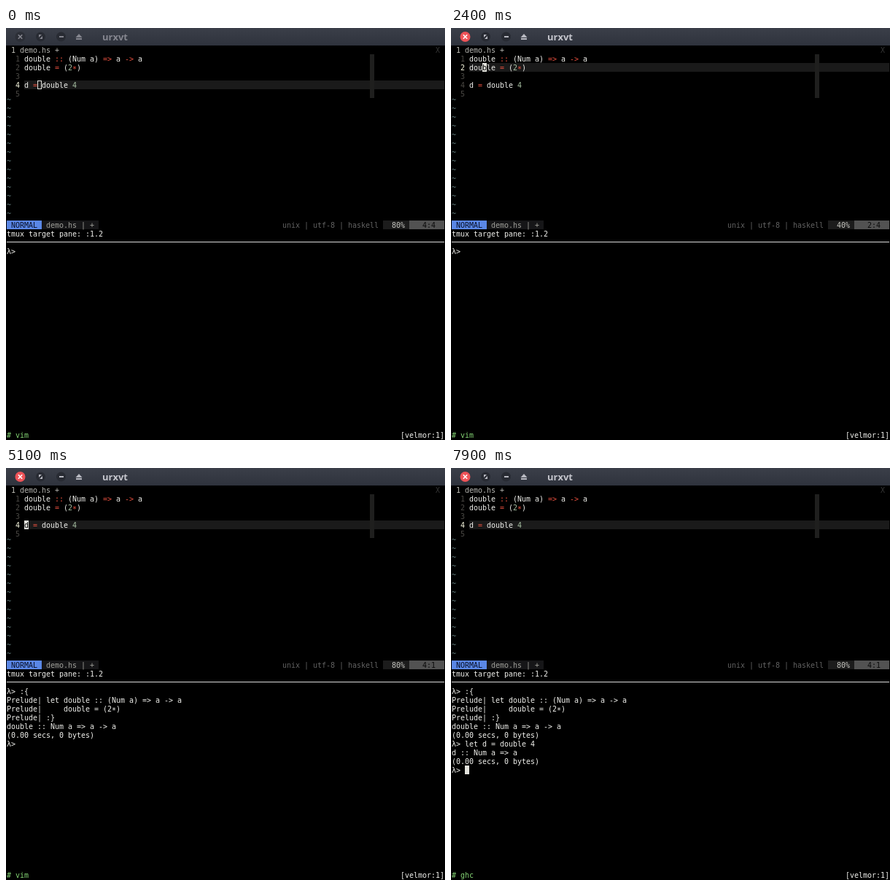
Write an HTML page with a canvas that moves like this. It is 602 by 565 pixels and loops after 8000 ms.

```html
<!DOCTYPE html>
<html lang="en">
<head>
<meta charset="utf-8">
<title>Terminal</title>
<style>
html, body { margin: 0; width: 100%; height: 100%; overflow: hidden; background: #000; }
canvas { display: block; width: 602px; height: 565px; }
</style>
</head>
<body>
<canvas id="stage" width="602" height="565"></canvas>
<script>
const ctx = document.getElementById('stage').getContext('2d');
const LOOP = 8000, CW = 6, CH = 12, LEFT = 1, TOP = 24;
const MONO = '10px "DejaVu Sans Mono", "Liberation Mono", monospace';
const FG = '#f0f0ec', RED = '#e8503f', NUM = '#a6bfa2', DIM = '#626262', BAND = '#1a1a1a';
// Glyphs that sit higher or lower in their cell than the font puts them
const LIFT = { '~': 4, '*': -2 };

const CODE = ['double :: (Num a) => a -> a', 'double = (2*)', '', 'd = double 4', ''];
const OUT_FN = [
  'λ> :{',
  'Prelude| let double :: (Num a) => a -> a',
  'Prelude|     double = (2*)',
  'Prelude| :}',
  'double :: Num a => a -> a',
  '(0.00 secs, 0 bytes)'
];
const OUT_D = ['λ> let d = double 4', 'd :: Num a => a', '(0.00 secs, 0 bytes)'];

// [time, line, column]
const MOVES = [[0, 4, 4], [2000, 3, 1], [2200, 2, 4], [3100, 1, 1],
               [4700, 2, 1], [4800, 3, 1], [4900, 4, 1]];
const FOCUS = 500, SEND_FN = 3100, SEND_D = 5900, SWITCH = 7500;

const colX = c => LEFT + c * CW;
const rowY = r => TOP + r * CH;

function fill(c, r, w, color, h = 1) {
  ctx.fillStyle = color;
  ctx.fillRect(colX(c), rowY(r), w * CW, h * CH);
}

function text(str, c, r, color) {
  ctx.font = MONO;
  ctx.fillStyle = color;
  [...str].forEach((ch, i) => {
    if (ch !== ' ') ctx.fillText(ch, colX(c + i), rowY(r) + 10 - (LIFT[ch] || 0));
  });
}

function codeLine(str, r) {
  let c = 4;
  for (const part of str.split(/(::|=>|->|[=*]|\d+)/)) {
    text(part, c, r, /^\d/.test(part) ? NUM : /^[:=*-]/.test(part) ? RED : FG);
    c += part.length;
  }
}

function disc(x, y, rad, color) {
  ctx.fillStyle = color;
  ctx.beginPath();
  ctx.arc(x, y, rad, 0, Math.PI * 2);
  ctx.fill();
}

function poly(color, ...pts) {
  ctx.fillStyle = color;
  ctx.beginPath();
  for (let i = 0; i < pts.length; i += 2) ctx.lineTo(pts[i], pts[i + 1]);
  ctx.fill();
}

function titleBar(active) {
  const grad = ctx.createLinearGradient(0, 0, 0, 24);
  grad.addColorStop(0, '#3b3f49');
  grad.addColorStop(1, '#2f333d');
  ctx.fillStyle = grad;
  ctx.fillRect(0, 0, 602, 24);

  const ink = active ? '#b9bac2' : '#85868f';
  disc(19.5, 12, 7, active ? '#ee5358' : '#2c2f37');
  disc(47.5, 12, 6.5, '#282b33');
  disc(75.5, 12, 6.5, '#282b33');

  ctx.strokeStyle = active ? '#fff' : ink;
  ctx.lineWidth = 1.6;
  ctx.beginPath();
  ctx.moveTo(16.8, 9.3); ctx.lineTo(22.2, 14.7);
  ctx.moveTo(22.2, 9.3); ctx.lineTo(16.8, 14.7);
  ctx.stroke();

  poly(ink, 45, 9, 49, 9, 45, 13);
  poly(ink, 50, 11, 50, 15, 46, 15);
  ctx.fillRect(73, 11, 6, 2);
  poly(ink, 100, 8, 104.5, 13, 95.5, 13);
  ctx.fillRect(96, 14, 8, 2);

  ctx.font = 'bold 13px "Open Sans", "Noto Sans", sans-serif';
  ctx.fillStyle = active ? '#c4c5cc' : '#85868f';
  ctx.fillText('urxvt', 132, 17);
}

function editor(line, col, active, inEditor) {
  text('1', 1, 0, '#c4c4bc');
  text('demo.hs +', 3, 0, '#b4b4b0');
  text('X', 98, 0, '#343434');

  fill(4, line, 96, BAND);
  fill(83, 1, 1, '#1f1f1e', 5);
  CODE.forEach((str, i) => {
    const current = i + 1 === line;
    text(String(i + 1), 2, i + 1, current ? '#f8f8e0' : '#4a4844');
    codeLine(str, i + 1);
  });
  for (let r = 6; r <= 19; r++) text('~', 0, r, '#668080');

  if (!inEditor) return;
  const c = col + 3;
  if (active) {
    fill(c, line, 1, '#e2e2dc');
    text(CODE[line - 1][col - 1] || ' ', c, line, '#000');
  } else {
    ctx.strokeStyle = '#e2e2dc';
    ctx.lineWidth = 1;
    ctx.strokeRect(colX(c) + 0.5, rowY(line) + 0.5, CW - 1, CH - 1);
  }
}

function statusLine(line, col) {
  fill(0, 20, 8, '#5a87e6');
  text('NORMAL', 1, 20, '#081028');
  fill(8, 20, 13, '#161618');
  text('demo.hs | +', 9, 20, '#a0a09a');
  text('unix | utf-8 | haskell', 63, 20, DIM);
  fill(86, 20, 6, '#1c1c1c');
  text(line * 20 + '%', 88, 20, '#c8c8c2');
  fill(92, 20, 8, '#525252');
  text(line + ':' + (CODE[line - 1] ? col : '0-1'), 95, 20, '#0c0c0c');
  text('tmux target pane: :1.2', 0, 21, FG);
}

function repl(t, inEditor) {
  const rows = [...(t >= SEND_FN ? OUT_FN : []), ...(t >= SEND_D ? OUT_D : []), 'λ>'];
  rows.forEach((str, i) => text(str, 0, 23 + i, FG));
  if (!inEditor) fill(3, 22 + rows.length, 1, '#e2e2dc');
}

function draw(t) {
  const active = t >= FOCUS, inEditor = t < SWITCH;
  const [, line, col] = MOVES.filter(m => m[0] <= t).pop();
  ctx.fillStyle = '#000';
  ctx.fillRect(0, 0, 602, 565);
  titleBar(active);
  editor(line, col, active, inEditor);
  statusLine(line, col);
  ctx.fillStyle = '#dcdcdc';
  ctx.fillRect(LEFT, 293, 600, 1);
  repl(t, inEditor);
  text('# ' + (inEditor ? 'vim' : 'ghc'), 0, 44, '#84d474');
  text('[velmor:1]', 90, 44, FG);
}

const start = performance.now();
function tick() {
  draw((performance.now() - start) % LOOP);
  requestAnimationFrame(tick);
}
tick();
</script>
</body>
</html>
```
